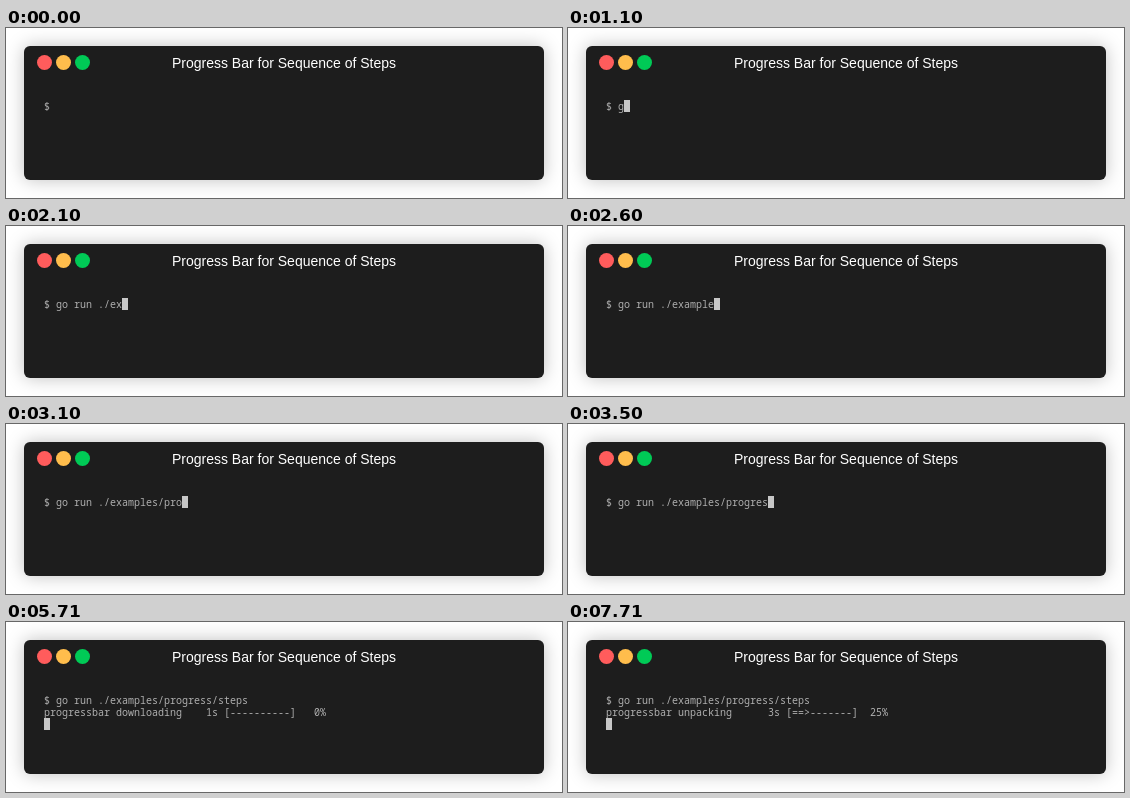
An HTML page for the animation above (8 s loop, 556 by 170 pixels).

```html
<!DOCTYPE html>
<html lang="en">
<head>
<meta charset="utf-8">
<title>Progress Bar for Sequence of Steps</title>
<style>
html, body { margin: 0; width: 556px; height: 170px; overflow: hidden; background: #fff; }
#window {
  position: absolute; left: 18px; top: 18px; width: 520px; height: 134px;
  border-radius: 6px; background: #1d1d1d; box-shadow: 0 0 18px rgba(0, 0, 0, .25);
}
#window > * { position: absolute; margin: 0; }
h1 {
  top: 9px; width: 100%; text-align: center; color: #fff;
  font: 14px/16px "Liberation Sans", Arial, sans-serif;
}
i { top: 9px; width: 15px; height: 15px; border-radius: 50%; }
pre { left: 20px; top: 54px; color: #afafaf; font: 10px/12px "Noto Sans Mono", monospace; }
#cursor { width: 6px; height: 12px; background: #c7c7c7; }
</style>
</head>
<body>
<div id="window">
  <i style="left:13px;background:#ff5c5c"></i>
  <i style="left:32px;background:#ffbd4c"></i>
  <i style="left:51px;background:#00ca56"></i>
  <h1>Progress Bar for Sequence of Steps</h1>
  <pre id="text"></pre>
  <div id="cursor"></div>
</div>
<script>
const LOOP = 8000, COMMAND = "go run ./examples/progress/steps";
const PAUSES = [14, 17, 22, 42]; // ticks of 100 ms without a redraw
const text = document.getElementById("text");
const cursor = document.getElementById("cursor");

function typed(t) {
  let tick = Math.floor(t / 100);
  if (PAUSES.includes(tick)) tick--;
  return COMMAND.slice(0, Math.max(0, tick - 10));
}

function progress(seconds) {
  const unpacking = seconds > 1;
  const step = (unpacking ? "unpacking" : "downloading").padEnd(11);
  const bar = unpacking ? "==>-------" : "----------";
  const percent = (unpacking ? "25%" : "0%").padStart(5);
  return `progressbar ${step}    ${seconds}s [${bar}]${percent}\n`;
}

function screen(t) {
  let out = "$ " + typed(t);
  if (t >= 4300) out += "\n";
  if (t >= 4710) out += progress(Math.floor((t - 4710) / 1000));
  return out;
}

function draw(now) {
  const t = now % LOOP, out = screen(t), lines = out.split("\n");
  text.textContent = out;
  cursor.hidden = t < 100;
  cursor.style.left = 20 + 6 * lines.at(-1).length + "px";
  cursor.style.top = 42 + 12 * lines.length + "px";
}

let start;
function frame(now) {
  start ??= now;
  draw(now - start);
  requestAnimationFrame(frame);
}
draw(0);
requestAnimationFrame(frame);
</script>
</body>
</html>
```
